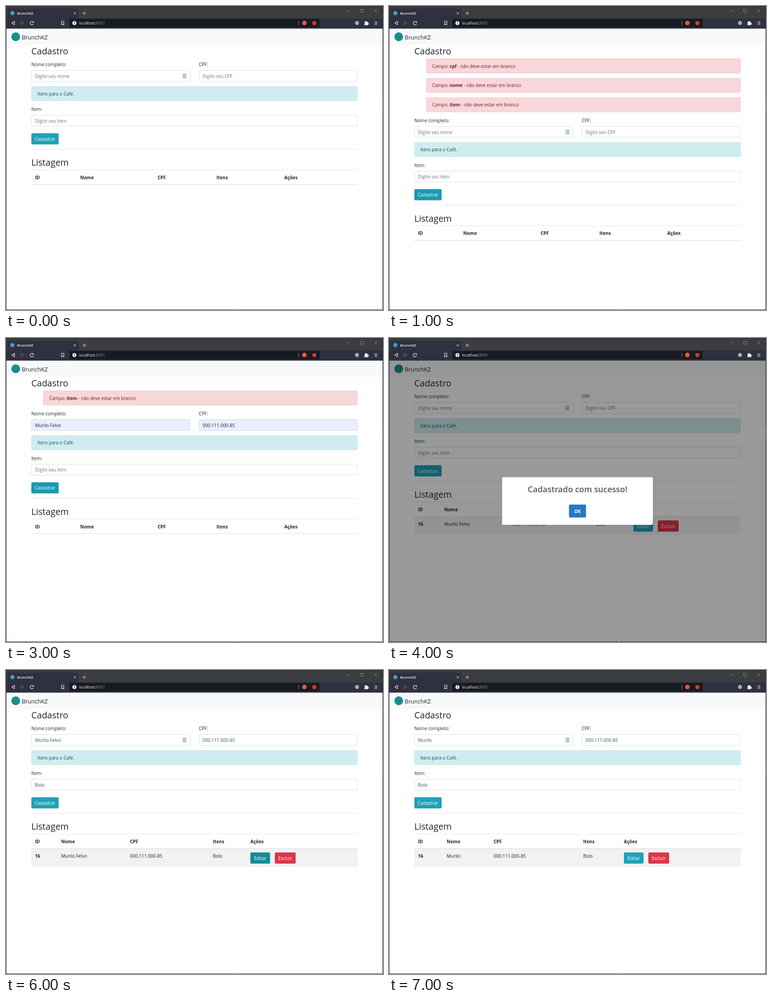
These frames come from a looping animation (833x672 px, 8 s). An HTML page:

```html
<!DOCTYPE html>
<html lang="pt-BR">
<head>
<meta charset="utf-8">
<title>BrunchKZ</title>
<style>
html, body { margin: 0; width: 100%; height: 100%; overflow: hidden; background: #fff; }
svg { display: block; width: 833px; height: 672px; font-family: "Open Sans", "Noto Sans", sans-serif; }
text { white-space: pre; }
</style>
</head>
<body>
<svg id="stage" viewBox="0 0 833 672" xmlns="http://www.w3.org/2000/svg">
  <g id="chrome"></g>
  <g id="page"></g>
  <g id="modal"></g>
  <g id="edge"></g>
</svg>
<script>
const STEP = 1000;
const FULL = "Murilo Felvo", FIRST = "Murilo", CPF = "000.111.000-85", ITEM = "Bolo";
const WIDE = [64, 164, 335, 465, 615];
const ROW_A = [64, 122, 274, 457, 540];
const ROW_B = [64, 127.5, 231, 429, 519];

// One state per second of the loop
const STATES = [
  { cols: WIDE },
  { cols: WIDE, errors: ["cpf", "nome", "item"], hover: "add" },
  { cols: WIDE, errors: ["cpf", "item"], name: FULL, auto: true, hover: "add" },
  { cols: WIDE, errors: ["item"], name: FULL, cpf: CPF, auto: true, hover: "add" },
  { cols: ROW_A, row: FULL, modal: true },
  { cols: ROW_A, row: FULL },
  { cols: ROW_A, row: FULL, name: FULL, cpf: CPF, item: ITEM, hover: "edit" },
  { cols: ROW_B, row: FIRST, name: FIRST, cpf: CPF, item: ITEM }
];

const el = id => document.getElementById(id);

function rect(x, y, w, h, fill, opt = {}) {
  const { r = 0, stroke = "none", sw = 0.8 } = opt;
  return `<rect x="${x}" y="${y}" width="${w}" height="${h}" rx="${r}" fill="${fill}" stroke="${stroke}" stroke-width="${sw}"/>`;
}

// y is the middle of the capitals
function text(x, y, str, fill = "#212529", opt = {}) {
  const { size = 10, weight = 400, anchor = "start" } = opt;
  return `<text x="${x}" y="${y + size * 0.36}" fill="${fill}" font-size="${size}" font-weight="${weight}" text-anchor="${anchor}">${str}</text>`;
}

const path = (d, stroke, sw = 1, fill = "none") =>
  `<path d="${d}" stroke="${stroke}" stroke-width="${sw}" fill="${fill}" stroke-linejoin="round"/>`;

const dot = (x, y, r, fill) => `<circle cx="${x}" cy="${y}" r="${r}" fill="${fill}"/>`;

function button(x, y, w, label, fill) {
  return rect(x, y, w, 24.7, fill, { r: 2.6 }) +
    text(x + w / 2, y + 12.7, label, "#fff", { anchor: "middle" });
}

function field(x, y, w, value, hint, auto) {
  const blue = auto && value;
  return rect(x + 0.4, y + 0.4, w - 0.8, 24, blue ? "#e8f0fe" : "#fff", { r: 2.4, stroke: "#ced4da" }) +
    text(x + 8.3, y + 13.2, value || hint, blue ? "#212529" : value ? "#495057" : "#6c757d");
}

function alertBox(x, y, w, label, fill, stroke, color) {
  return rect(x + 0.4, y + 0.4, w - 0.8, 31.8, fill, { r: 2.4, stroke }) +
    text(x + 13.4, y + 16.7, label, color);
}

function drawChrome() {
  const white = "#f1f1f3", gray = "#8d8f96";
  return rect(0, 0, 833, 28, "#3c3d41") +
    rect(0, 27, 833, 23, "#2f3140") +
    path("M3 28V9Q3 6 6 6H157Q160 6 160 9V28Z", "none", 0, "#2f3140") +
    dot(14, 15.7, 4.6, "#3f9fc4") +
    text(24.5, 16, "BrunchKZ", "#f4f4f6", { size: 7.6, weight: 600 }) +
    path("M149.7 13.8l4.4 4.4m0-4.4l-4.4 4.4", white, 1) +
    path("M169 16h8M173 12v8", "#d5d5d8", 1) +
    path("M753.5 10.5h7", gray, 0.9) +
    path("M783.5 7.5h6.3v6.3h-6.3z", gray, 0.9) +
    path("M813.5 7.2l6.4 6.4m0-6.4l-6.4 6.4", gray, 0.9) +
    path("M18.8 34v7.4l-6-3.7z", white, 1.1) +
    path("M33.4 34v7.4l6-3.7z", "#72747f", 1) +
    path("M60.3 35.6a3.8 3.8 0 1 0 .6 3.2", white, 1.2) +
    path("M61.6 33.6v3.2h-3.2z", "none", 0, white) +
    path("M122.8 33.8h5v8l-2.5-2.2-2.5 2.2z", white, 1.1) +
    rect(140, 28.5, 553, 18.5, "#181a22", { r: 2.5 }) +
    dot(151.2, 37.7, 4.5, white) +
    rect(150.6, 34.8, 1.3, 3.6, "#181a22") + rect(150.6, 39.3, 1.3, 1.3, "#181a22") +
    text(161.7, 37.8, `localhost<tspan fill="#8b8d95">:8081</tspan>`, "#f4f4f6", { size: 8.45 }) +
    rect(646.5, 33, 0.9, 9.5, "#a9abb2") +
    dot(659.2, 37.6, 5, "#ef5a2b") +
    dot(681.3, 37.8, 4.6, "#d0412f") +
    dot(775.5, 37.6, 4.5, "#a5a8ae") +
    path("M792.3 35.6h2.1a1.5 1.5 0 1 1 2.8 0h2.2v2.2a1.5 1.5 0 1 1 0 2.7v1.8h-2.4a1.4 1.4 0 0 0-2.6 0h-2.1v-2.4a1.4 1.4 0 0 0 0-2.3z", white, 0.5, white) +
    path("M814.3 35h6M814.3 37.8h6M814.3 40.6h6", white, 1);
}

function drawForm(s, dy) {
  const y = v => v + dy;
  const name = field(56, y(142.2), 351, s.name, "Digite seu nome", s.auto);
  const card = s.auto ? "" :
    rect(391, y(150.3), 6.6, 8.8, "#fff", { r: 0.6, stroke: "#777b80", sw: 1 }) +
    dot(394.3, y(153.2), 1.1, "#777b80") +
    rect(392.7, y(155), 3.2, 1.3, "#777b80") + rect(392.7, y(157), 3.2, 0.7, "#777b80");
  return text(56, y(129.7), "Nome completo:") +
    text(426, y(129.7), "CPF:") +
    name + card +
    field(426, y(142.2), 351, s.cpf, "Digite seu CPF", s.auto) +
    alertBox(56, y(177.4), 721, "Itens para o Café.", "#d1ecf1", "#bee5eb", "#0c5460") +
    text(56, y(228.6), "Item:") +
    field(56, y(240.9), 721, s.item, "Digite seu item") +
    button(56, y(281.2), 60.3, "Cadastrar", s.hover === "add" ? "#1b9aae" : "#1fa2b8") +
    rect(56, y(316.2), 721, 0.8, "#dfdfdf");
}

function drawTable(s, dy) {
  const [id, name, cpf, item, acts] = s.cols;
  const bold = { weight: 700 };
  const heads = ["ID", "Nome", "CPF", "Itens", "Ações"]
    .map((h, i) => text(s.cols[i], 379.3 + dy, h, "#212529", bold)).join("");
  let out = text(56, 346 + dy, "Listagem", "#212529", { size: 19.7, weight: 500 }) +
    rect(56, 362 + dy, 721, 0.8, "#dee2e6") + heads;
  if (s.row) {
    out += rect(56, 395, 721, 40, "#f2f2f2") +
      text(id, 411.7, "16", "#212529", bold) +
      text(name, 411.7, s.row) + text(cpf, 411.7, CPF) + text(item, 411.7, ITEM) +
      button(acts, 403.2, 43.5, "Editar", s.hover === "edit" ? "#17899c" : "#1fa2b8") +
      button(acts + 54, 403.2, 46, "Excluir", "#dc3648");
  }
  return out + rect(56, 394 + dy, 721, 1.3, "#dee2e6");
}

function drawPage(s) {
  const errors = s.errors || [];
  const dy = errors.length ? 42.9 * errors.length - 5.2 : 0;
  const list = errors.map((e, i) => alertBox(82, 116.2 + 42.9 * i, 695,
    `Campo: <tspan font-weight="700">${e}</tspan> - não deve estar em branco`,
    "#f8d7da", "#f5c6cb", "#721c24")).join("");
  return rect(0, 50, 833, 622, "#fff") +
    rect(0, 50, 833, 36, "#f8f9fa") +
    dot(21.5, 68, 9.7, "#168f8c") +
    text(34.8, 69, "BrunchKZ", "#212529", { size: 12.6 }) +
    text(56, 100, "Cadastro", "#212529", { size: 19.5, weight: 500 }) +
    list + drawForm(s, dy) + drawTable(s, dy);
}

function drawModal() {
  return rect(0, 50, 833, 622, "rgba(0,0,0,.4)") +
    rect(250, 307.8, 333, 105.2, "#fff", { r: 3.2 }) +
    text(416.5, 334, "Cadastrado com sucesso!", "#595959", { size: 18.1, weight: 600, anchor: "middle" }) +
    rect(397.7, 368.2, 37.6, 28.6, "#2778c4", { r: 2.6 }) +
    text(416.5, 383, "OK", "#fff", { weight: 700, anchor: "middle" });
}

function drawEdge() {
  return path("M.5 0V671.5H832.5V0", "#26272b", 1) +
    rect(0, 0, 833, 0.8, "#26272b") +
    rect(505, 670.6, 5, 1, "#a8a8a8") +
    [198, 205, 211, 217, 223].map(y => rect(831.5, y, 1.5, 3, "#a3705a")).join("");
}

let shown = -1;
function render(ms) {
  const i = Math.floor(ms / STEP) % STATES.length;
  if (i === shown) return;
  shown = i;
  el("page").innerHTML = drawPage(STATES[i]);
  el("modal").innerHTML = STATES[i].modal ? drawModal() : "";
}

el("chrome").innerHTML = drawChrome();
el("edge").innerHTML = drawEdge();
const start = performance.now();
function tick() {
  render(performance.now() - start);
  requestAnimationFrame(tick);
}
tick();
</script>
</body>
</html>
```
